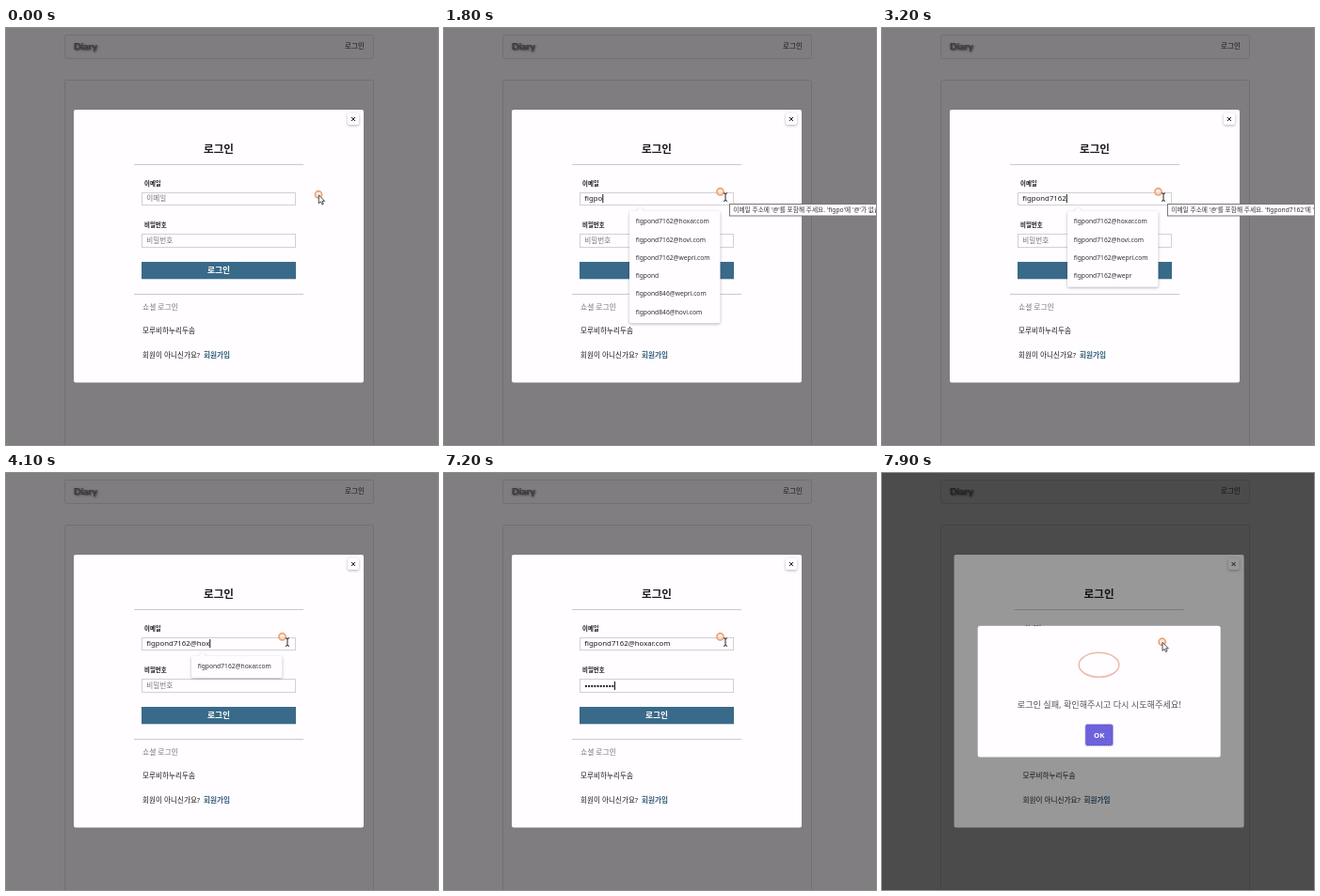
Write an HTML page that moves like this. It is 459x444 px and loops after 8000 ms.

```html
<!DOCTYPE html>
<html lang="ko">
<head>
<meta charset="utf-8">
<title>로그인</title>
<style>
  html, body { margin: 0; width: 100%; height: 100%; overflow: hidden; background: #807e80; }
  svg { display: block; width: 459px; height: 444px; }
  text { font-family: "Noto Sans", "Noto Sans CJK KR", sans-serif; fill: #1c1a1c; white-space: pre; }
  .body { font-size: 7.6px; }
  .bold { font-weight: 700; }
  .label { font-size: 6.4px; font-weight: 700; }
  .hint { font-size: 7.6px; fill: #777577; }
  .typed { font-size: 7.8px; }
  .small { font-size: 6.7px; fill: #333133; }
  .mid { text-anchor: middle; }
  .logo { font: 700 10.3px Lato, sans-serif; fill: #3b393b; text-shadow: 1px 1px 2px #333, -1px 0 1px #666; }
  .field { fill: #fffdff; stroke: #d2d0d2; }
  .rule { stroke: #cbc9cb; }
  .frame { fill: #7f7d7f; stroke: #716f71; }
  .soft { filter: drop-shadow(0 1px 1.5px rgba(0, 0, 0, .3)); }
</style>
</head>
<body>
<svg viewBox="0 0 459 444">
  <rect width="459" height="444" fill="#807e80"/>
  <rect class="frame" x="62.5" y="7.5" width="328" height="25" rx="2"/>
  <rect class="frame" x="62.5" y="55.5" width="328" height="400" rx="2"/>
  <text class="logo" x="72" y="22.5">Diary</text>
  <text class="body" x="360" y="22">로그인</text>

  <g id="modal">
    <rect x="72" y="87" width="308" height="290.5" rx="2" fill="#fffdff"/>
    <rect class="soft" x="363" y="90.5" width="12" height="12.5" rx="2" fill="#fffdff"/>
    <path d="M367 95l4 4m0-4l-4 4" stroke="#222" stroke-width="1"/>
    <text class="bold mid" x="226" y="133" font-size="11.6">로그인</text>
    <path class="rule" d="M136 145.5h180M136 283.5h180"/>

    <text class="label" x="147" y="167.5">이메일</text>
    <rect class="field" x="144.5" y="175.5" width="163" height="13"/>
    <text class="hint" id="emailHint" x="149.3" y="184.3">이메일</text>
    <text class="typed" id="email" x="149.3" y="184.2"></text>

    <text class="label" x="147" y="212">비밀번호</text>
    <rect class="field" x="144.5" y="219.5" width="163" height="14"/>
    <text class="hint" id="passwordHint" x="149.3" y="229">비밀번호</text>
    <g id="dots" fill="#222"></g>
    <rect id="caret" width="1" height="9" fill="#111"/>

    <rect x="144" y="249" width="164" height="18.3" fill="#3a6a89"/>
    <text class="bold mid" x="226" y="261" font-size="8.7" style="fill:#fff">로그인</text>
    <text class="hint" x="145" y="299.8" style="font-size:7.8px">쇼셜 로그인</text>
    <text class="body" x="145" y="325">모루비하누리두솜</text>
    <text class="body" x="145" y="351">회원이 아니신가요?</text>
    <text class="body bold" x="210" y="351" style="fill:#305c7a">회원가입</text>
  </g>

  <g id="list">
    <g class="soft">
      <rect id="listBox" x="197" y="195" width="96.5" rx="2" fill="#fffdff"/>
      <path d="M204 195.5l4.5-4.5 4.5 4.5z" fill="#fffdff"/>
    </g>
    <g id="items"></g>
  </g>

  <g id="tip">
    <rect x="303.5" y="187.5" width="190" height="12.5" fill="#fffdff" stroke="#777"/>
    <text class="small" id="tipText" x="307.3" y="196.3"></text>
  </g>

  <rect id="shade" width="459" height="444"/>
  <g id="alert">
    <rect x="101.7" y="162.7" width="258" height="139.7" rx="2.5" fill="#fffdff"/>
    <ellipse id="icon" cx="230.5" cy="204.3" rx="21.3" ry="13" fill="none" stroke="#edb9aa" stroke-width="1.5"/>
    <text class="mid" x="230.7" y="249.6" font-size="9.15" style="fill:#555355">로그인 실패, 확인해주시고 다시 시도해주세요!</text>
    <rect x="215.5" y="267" width="30.5" height="24" rx="2.5" fill="#cbc6f5"/>
    <rect x="216.5" y="268" width="28.5" height="22" rx="2" fill="#6d62dc" stroke="#4d44a8" stroke-width=".8" stroke-dasharray="1 1"/>
    <text class="mid bold" x="230.7" y="281.7" font-size="7.8" style="fill:#fff">OK</text>
  </g>

  <g id="pointer">
    <circle r="3.6" fill="#f8dcc8" fill-opacity=".6" stroke="#f0a273" stroke-width="1.7"/>
    <path id="arrow" d="M.3.5v9l2.1-1.9 1.4 3 1.5-.7-1.4-2.9h2.7z" fill="#fff" stroke="#222" stroke-width=".8"/>
    <path id="beam" d="M3.5 1.5q2 0 2 1.2q0-1.2 2-1.2M5.5 2.5v6.5M3.5 10q2 0 2-1.2q0 1.2 2 1.2" fill="none" stroke="#222" stroke-width="1"/>
  </g>
</svg>
<script>
const LOOP = 8000;
const EMAIL = "figpond7162@hoxar.com";
const SAVED = [
  "figpond7162@hoxar.com", "figpond7162@hovi.com", "figpond7162@wepri.com",
  "figpond", "figpond846@wepri.com", "figpond846@hovi.com", "figpond7162@wepr"
];
// Time of each keystroke in milliseconds.
const EMAIL_KEYS = [1200, 1400, 1500, 1600, 1800, 1900, 2000, 2500, 2700, 3000, 3200,
  3600, 3900, 4000, 4100, 4700, 4700, 4900, 5000, 5100, 5300];
const PASSWORD_KEYS = [5900, 6000, 6100, 6200, 6300, 6600, 6600, 6800, 7100, 7200];
const TEXT_X = 149.3, DOT_STEP = 3.17, ROW = 19.25;

const $ = id => document.getElementById(id);
const show = (id, on) => $(id).setAttribute("display", on ? "inline" : "none");
const set = (id, attrs) => Object.entries(attrs).forEach(([k, v]) => $(id).setAttribute(k, v));
const between = (t, a, b) => t >= a && t < b;
const typedCount = (keys, t) => keys.filter(k => k <= t).length;

function add(parent, tag, attrs, text = "") {
  const node = document.createElementNS("http://www.w3.org/2000/svg", tag);
  Object.entries(attrs).forEach(([k, v]) => node.setAttribute(k, v));
  node.textContent = text;
  return $(parent).appendChild(node);
}

const rows = Array.from({ length: 6 }, (_, i) =>
  add("items", "text", { class: "small", x: 203.7, y: 208.4 + i * ROW }));
const dots = PASSWORD_KEYS.map((_, i) =>
  add("dots", "circle", { cx: TEXT_X + 1.6 + i * DOT_STEP, cy: 227, r: 1.15 }));

function drawFields(t) {
  const text = EMAIL.slice(0, typedCount(EMAIL_KEYS, t));
  const dotCount = typedCount(PASSWORD_KEYS, t);
  const onPassword = t >= 5500;
  $("email").textContent = text;
  show("emailHint", !text);
  show("passwordHint", !dotCount);
  dots.forEach((dot, i) => dot.setAttribute("display", i < dotCount ? "inline" : "none"));

  const width = onPassword ? dotCount * DOT_STEP : text ? $("email").getComputedTextLength() : 0;
  set("caret", { x: TEXT_X + width, y: onPassword ? 222 : 177 });
  show("caret", between(t, 600, 1000) || between(t, 1200, 7800));
  return text;
}

function drawHelpers(t, text) {
  const matches = SAVED.filter(s => s.startsWith(text)).slice(0, 6);
  show("list", text && t < 5500);
  set("listBox", { height: matches.length * ROW + 3.7 });
  rows.forEach((row, i) => row.textContent = matches[i] || "");
  show("tip", between(t, 1400, 3400));
  $("tipText").textContent = `이메일 주소에 '@'를 포함해 주세요. '${text}'에 '@'가 없습니다.`;
}

function drawPointer(t) {
  const p = Math.min(1, Math.max(0, (t - 50) / 650));
  const ease = p * p * (3 - 2 * p);
  const failed = t >= 7800;
  const x = failed ? 297.7 : 332 - 38.5 * ease;
  const y = failed ? 179.8 : 177.3 - 3 * ease;
  const inField = !failed && x < 303;
  set("pointer", { transform: `translate(${x} ${y})` });
  show("arrow", !inField);
  show("beam", inField);
}

function drawAlert(t) {
  const failed = t >= 7800, open = t >= 7900;
  const scale = open ? 1 : 0.755;
  set("modal", { transform: `translate(${failed ? 4.6 : 0} 0)` });
  set("shade", { "fill-opacity": open ? 0.4 : failed ? 0.25 : 0 });
  set("alert", { transform: `translate(230.7 232.5) scale(${scale}) translate(-230.7 -232.5)` });
  show("alert", failed);
  show("icon", open);
}

function render(t) {
  drawHelpers(t, drawFields(t));
  drawPointer(t);
  drawAlert(t);
}

const start = performance.now();
function tick() {
  render((performance.now() - start) % LOOP);
  requestAnimationFrame(tick);
}
tick();
</script>
</body>
</html>
```
